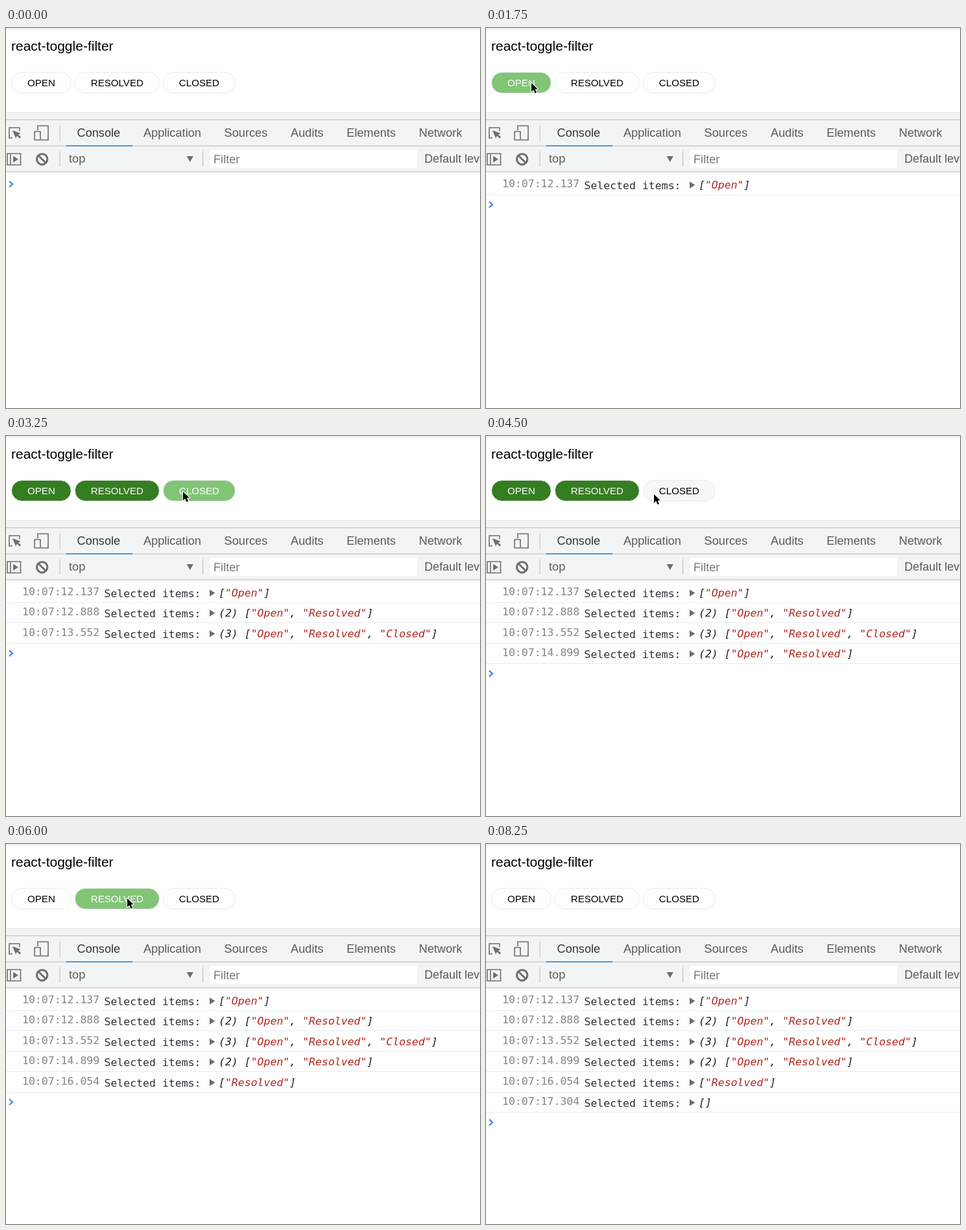
An HTML page with a canvas for the animation above (9250 ms loop, 731 by 587 pixels).

```html
<!DOCTYPE html>
<html lang="en">
<head>
<meta charset="utf-8">
<title>react-toggle-filter</title>
<style>
html, body { margin: 0; width: 100%; height: 100%; overflow: hidden; background: #fefefe; }
canvas { display: block; }
</style>
</head>
<body>
<canvas id="stage" width="731" height="587"></canvas>
<script>
const ctx = document.getElementById('stage').getContext('2d');
const LOOP = 9250;
const STEP = 250;
const ROW = 31.45;
const GRAY = '#6e6e6e';
const sans = size => `${size}px "Liberation Sans", Arial, sans-serif`;
const MONO = '16.5px "DejaVu Sans Mono", monospace';
const LABEL = sans(15.1);
const TAB = sans(18.2);

const snap = t => Math.round(t / STEP) * STEP;
const easeOut = u => 1 - (1 - u) ** 2;
const easeIn = u => u * u;

// Places words in a row, each as wide as its text plus padding.
function layOut(words, font, x, padding, gap) {
  ctx.font = font;
  return words.map(name => {
    const cell = { name, x, w: ctx.measureText(name).width + padding };
    x += cell.w + gap;
    return cell;
  });
}

const pills = layOut(['OPEN', 'RESOLVED', 'CLOSED'], LABEL, 8, 50, 5);
const tabs = layOut(['Console', 'Application', 'Sources', 'Audits', 'Elements', 'Network'], TAB, 109.5, 0, 35.7);

// Every click toggles one item and logs the selection at its clock second.
const names = ['Open', 'Resolved', 'Closed'];
const clicks = [['Open', 12.137], ['Resolved', 12.888], ['Closed', 13.552],
  ['Closed', 14.899], ['Open', 16.054], ['Resolved', 17.304]];
const active = new Set();
const logs = clicks.map(([name, second]) => {
  if (!active.delete(name)) active.add(name);
  return {
    at: snap(1750 + (second - clicks[0][1]) * 1000),
    stamp: `10:07:${second.toFixed(3)}`,
    items: names.filter(item => active.has(item)),
  };
});

// The pointer rests between moves.
const entry = { x: 350, y: 197 };
const moves = [
  { from: 250, to: 1000, x: 38, y: 38 },
  { from: 1000, to: 1750, x: 70, y: 85 },
  { from: 2000, to: 3000, x: 273, y: 86 },
  { from: 3500, to: 4250, x: 259, y: 90 },
  { from: 4750, to: 5500, x: 70, y: 85 },
  { from: 5750, to: 6000, x: 187, y: 84 },
  { from: 7250, to: 8250, x: 895, y: -65, ease: easeIn },
];

function pointerAt(t) {
  let { x, y } = entry;
  for (const move of moves) {
    const u = Math.min(1, Math.max(0, (t - move.from) / (move.to - move.from)));
    const k = (move.ease || easeOut)(u);
    x += (move.x - x) * k;
    y += (move.y - y) * k;
  }
  return { x: Math.round(x), y: Math.round(y), visible: t >= moves[0].from };
}

function rect(x, y, w, h, color) {
  ctx.fillStyle = color;
  ctx.fillRect(x, y, w, h);
}

function text(str, x, y, font, color) {
  ctx.font = font;
  ctx.fillStyle = color;
  ctx.fillText(str, x, y);
}

function trace(points) {
  ctx.beginPath();
  points.forEach(([x, y]) => ctx.lineTo(x, y));
}

function polygon(points, color) {
  trace(points);
  ctx.fillStyle = color;
  ctx.fill();
}

function stroke(color, width) {
  ctx.strokeStyle = color;
  ctx.lineWidth = width;
  ctx.stroke();
}

function polyline(points, color, width) {
  trace(points);
  stroke(color, width);
}

function box(x, y, w, h) {
  ctx.beginPath();
  ctx.rect(x, y, w, h);
  stroke(GRAY, 1.6);
}

function play(x, y, w, h) {
  polygon([[x, y - h / 2], [x + w, y], [x, y + h / 2]], GRAY);
}

// Arrow with its tip at x, y; outlined in white when asked.
function arrow(x, y, turn, color, outline) {
  ctx.save();
  ctx.translate(x, y);
  ctx.rotate(turn);
  trace([[0, 0], [0, 13.5], [3.1, 10.6], [5.5, 15.8], [8, 14.7], [5.7, 9.6], [9.8, 9.5]]);
  ctx.closePath();
  ctx.lineJoin = 'round';
  if (outline) stroke('#fff', 2.2);
  ctx.fillStyle = color;
  ctx.fill();
  ctx.restore();
}

function drawPill({ name, x, w }, selected, hovered) {
  ctx.beginPath();
  ctx.roundRect(x + .5, 68.5, w - 1, 32, 16);
  ctx.fillStyle = selected ? (hovered ? '#82c577' : '#357d22') : (hovered ? '#f7f7f7' : '#fefefe');
  ctx.fill();
  stroke('#ebebeb', 1);
  text(name, x + 25, 90, LABEL, selected ? '#fff' : '#000');
}

function drawIcons() {
  polyline([[10, 170], [5, 170], [5, 154], [21, 154], [21, 159]], GRAY, 1.6);
  arrow(10, 158, -Math.PI / 8, GRAY);

  polyline([[49, 158], [49, 151], [65, 151], [65, 173], [54, 173]], GRAY, 1.6);
  box(44, 160, 9, 13);

  box(2, 194, 20.5, 17.5);
  rect(6, 194, 1.6, 18, GRAY);
  play(11, 202.7, 8, 10);

  ctx.beginPath();
  ctx.arc(55.7, 202.7, 8.2, 0, 2 * Math.PI);
  stroke(GRAY, 3);
  polyline([[50, 197], [61.5, 208.5]], GRAY, 3);
}

function drawToolbar() {
  rect(0, 130, 731, 92, '#f3f4f4');
  rect(0, 130, 731, 1, '#e4e6e6');
  for (const y of [141, 181.5, 221.5]) rect(0, y, 731, 1.4, '#cacccc');
  rect(93, 181, 102, 2, '#4599dc');
  for (const [x, y] of [[82.5, 150], [82.5, 190], [303, 190]]) rect(x, y, 1.2, 24, '#c6c6c6');
  drawIcons();

  tabs.forEach(({ name, x }, i) => text(name, x, 168, TAB, i ? '#5a5a5a' : '#333'));
  text('top', 97, 208, TAB, '#5a5a5a');
  polygon([[278.5, 198], [289, 198], [283.7, 207]], GRAY);
  rect(315, 188, 319, 28, '#fff');
  text('Filter', 320, 209, TAB, '#777');
  text('Default lev', 645.3, 208, sans(18), '#5a5a5a');
}

function drawLog({ stamp, items }, row) {
  const y = Math.round(row * ROW);
  text(stamp, 25, 246 + y, MONO, '#858585');
  text('Selected items:', 151.5, 249 + y, MONO, '#2b3138');
  play(314, 242.5 + y, 8.5, 10.5);

  let x = 328;
  const put = (str, color = '#222') => {
    text(str, x, 248 + y, `italic ${MONO}`, color);
    x += ctx.measureText(str).width;
  };
  put(items.length > 1 ? `(${items.length}) [` : '[');
  items.forEach((item, i) => {
    if (i) put(', ');
    put(`"${item}"`, '#b3261e');
  });
  put(']');
  rect(0, 257 + y, 731, 1, '#e6edee');
}

function draw(t) {
  const shown = logs.filter(log => log.at <= t);
  const selected = shown.length ? shown[shown.length - 1].items : [];
  const pointer = pointerAt(t);

  rect(0, 0, 731, 587, '#fefefe');
  rect(0, 1, 731, 1, '#e2e2e2');
  text('react-toggle-filter', 8, 35, sans(21), '#000');
  pills.forEach((pill, i) => {
    const hovered = pointer.x >= pill.x && pointer.x < pill.x + pill.w
      && pointer.y >= 68 && pointer.y < 101;
    drawPill(pill, selected.includes(names[i]), hovered);
  });
  drawToolbar();
  shown.forEach(drawLog);
  const y = 241.3 + shown.length * ROW;
  polyline([[5, y - 4.5], [10, y], [5, y + 4.5]], '#4285e0', 2.2);
  if (pointer.visible) arrow(pointer.x, pointer.y, 0, '#000', true);
}

const start = performance.now();
function tick() {
  const t = (performance.now() - start) % LOOP;
  draw(Math.floor(t / STEP) * STEP);
  requestAnimationFrame(tick);
}
tick();
</script>
</body>
</html>
```
